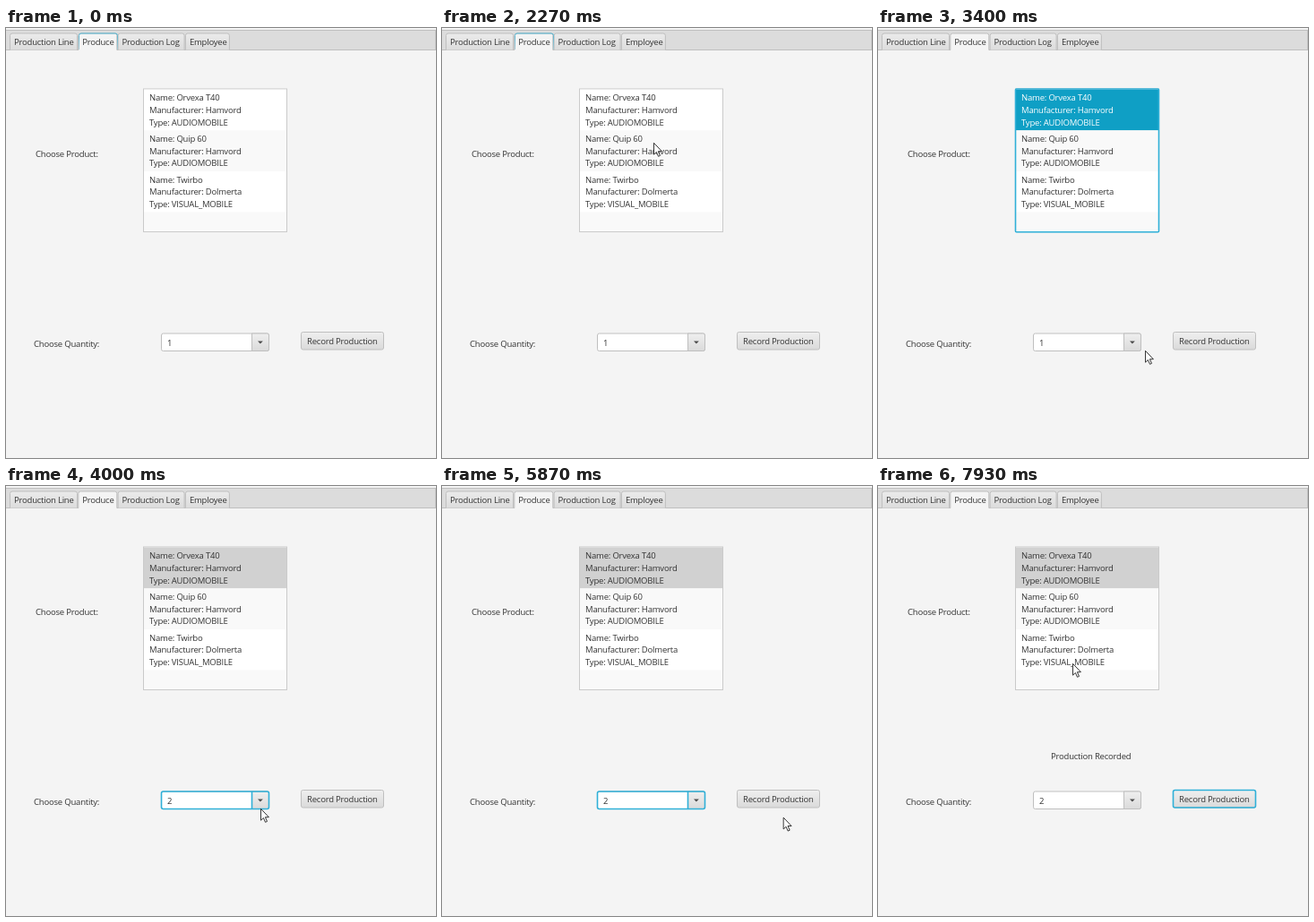
These frames come from a looping animation (480x480 px, 8 s). An HTML page:

```html
<!DOCTYPE html>
<html lang="en">
<head>
<meta charset="utf-8">
<title>Produce</title>
<style>
  html, body { margin: 0; width: 100%; height: 100%; overflow: hidden; background: #f4f4f4; }
  svg { display: block; width: 100%; height: 100%; }
  text { font: 9.5px "Open Sans", "Noto Sans", sans-serif; letter-spacing: -.2px; fill: #333; white-space: pre; }
  .edge { stroke: #bfbfbf; }
  .focus { fill: none; stroke: #2fb0d8; stroke-width: 1.6; }
</style>
</head>
<body>
<svg viewBox="0 0 480 480">
  <defs>
    <linearGradient id="raised" x2="0" y2="1"><stop stop-color="#efefef"/><stop offset="1" stop-color="#dadada"/></linearGradient>
    <linearGradient id="pressed" x2="0" y2="1"><stop stop-color="#d9d9d9"/><stop offset="1" stop-color="#c6c6c6"/></linearGradient>
    <linearGradient id="tab" x2="0" y2="1"><stop stop-color="#ebebeb"/><stop offset="1" stop-color="#dcdcdc"/></linearGradient>
    <linearGradient id="tabGlow" gradientUnits="userSpaceOnUse" x2="0" y1="6" y2="24">
      <stop stop-color="#4fb4d2"/><stop offset="1" stop-color="#a9c6d0"/>
    </linearGradient>
  </defs>
  <rect width="480" height="480" fill="#f4f4f4"/>
  <rect x="-.5" y="2.5" width="480" height="22" fill="#dcdcdc" class="edge"/>
  <g id="tabs"></g>
  <path id="tabFocus" fill="none" stroke="url(#tabGlow)" d="M81.5 24V8.5q0-2.5 2.5-2.5h38q2.5 0 2.5 2.5V24"/>

  <text x="33" y="144">Choose Product:</text>
  <rect x="153.5" y="68" width="160" height="159.5" fill="#f9f9f9" stroke="#cacaca"/>
  <g id="list"></g>
  <rect id="listFocus" class="focus" x="153.5" y="68" width="160" height="159.7" rx="1"/>

  <text id="status" x="193" y="304.7">Production Recorded</text>

  <text x="31" y="355.5">Choose Quantity:</text>
  <rect x="173.5" y="341" width="120" height="19.5" rx="2" fill="#fff" class="edge"/>
  <path d="M274.5 341H291.5q2 0 2 2V358.5q0 2-2 2H274.5Z" fill="url(#raised)" class="edge"/>
  <path d="M281 349.5h5.8l-2.9 3Z" fill="#4a4a4a"/>
  <text id="quantity" x="180" y="354.5">1</text>
  <path id="comboFocus" class="focus" d="M175.5 341H291.5q2 0 2 2V358.5q0 2-2 2H175.5q-2 0-2-2V343q0-2 2-2ZM274.5 341V360.5"/>

  <rect id="button" x="329.5" y="339.5" width="92" height="19.5" rx="2" fill="url(#raised)" class="edge"/>
  <rect id="buttonFocus" class="focus" x="329.5" y="339.5" width="92" height="19.5" rx="2"/>
  <text x="336" y="353">Record Production</text>

  <path id="cursor" d="M.5.3V13.2L3.4 10.5 5.5 15.3 7.5 14.4 5.4 9.7H9.4Z" fill="#fff" stroke="#222" stroke-width=".9"/>
</svg>
<script>
const FRAMES_PER_SECOND = 15, LOOP_SECONDS = 8;
const el = id => document.getElementById(id);

let tabX = 4.5;
for (const [label, width] of Object.entries({ "Production Line": 75, "Produce": 43, "Production Log": 74, "Employee": 49 })) {
  const active = label === "Produce";
  el("tabs").innerHTML += `
    <path d="M${tabX} 24.5V8.5q0-2.5 2.5-2.5h${width - 5}q2.5 0 2.5 2.5V24.5" class="edge"
      fill="${active ? "#f4f4f4" : "url(#tab)"}"/>
    ${active ? `<path d="M${tabX + .5} 24.5h${width - 1}" stroke="#f4f4f4"/>` : ""}
    <text x="${tabX + 4.5}" y="19.3">${label}</text>`;
  tabX += width + 1.3;
}

const products = [
  ["Orvexa T40", "Hamvord", "AUDIOMOBILE"],
  ["Quip 60", "Hamvord", "AUDIOMOBILE"],
  ["Twirbo", "Dolmerta", "VISUAL_MOBILE"]
];
const ROW = 45.6;
el("list").innerHTML = products.map(([name, maker, type], i) => {
  const top = 68.7 + i * ROW;
  const lines = [`Name: ${name}`, `Manufacturer: ${maker}`, `Type: ${type}`];
  return `<g><rect x="154" y="${top}" width="159" height="${ROW}" fill="${i % 2 ? "#f9f9f9" : "#fff"}"/>` +
    lines.map((line, n) => `<text x="160" y="${top + 12.7 + n * 13.6}">${line}</text>`).join("") + "</g>";
}).join("");
const firstRow = el("list").firstElementChild;

// Moments of the clicks, in seconds
const SELECT = 3.13, OPEN = 3.8, PICK = 4, PRESS = 6.86, RECORD = 7;

const spots = {
  tabs: [98, 10], list: [200, 90], listMiddle: [236, 128], listEdge: [174, 114], listEnd: [217, 198],
  productLabel: [74, 103], quantityLabel: [33, 341], quantity: [179, 341],
  arrow: [284, 360], besideArrow: [298, 360], belowButton: [382, 370], button: [372, 351]
};

// Each trip: departure, arrival, destination
const trips = [
  [.07, .13, "productLabel"], [.33, .6, "tabs"], [.6, 1.2, "list"], [1.27, 1.53, "listEnd"],
  [1.6, 1.8, "productLabel"], [1.93, 2.26, "listMiddle"], [2.4, 2.8, "quantityLabel"],
  [2.8, SELECT, "list"], [SELECT, 3.4, "besideArrow"], [3.4, OPEN, "arrow"], [PICK, 4.4, "tabs"],
  [4.4, 4.8, "listEdge"], [4.8, 5.2, "arrow"], [5.4, 5.86, "belowButton"], [5.86, 6, "quantity"],
  [6.13, 6.53, "button"], [RECORD, 7.33, "productLabel"], [7.33, 7.66, "button"], [7.7, 7.93, "listEnd"]
];

function pointerAt(time) {
  let [x, y] = spots.button;
  for (const [leave, arrive, name] of trips) {
    const u = Math.min(1, Math.max(0, (time - leave) / (arrive - leave)));
    const ease = u * u * (3 - 2 * u), [toX, toY] = spots[name];
    x += (toX - x) * ease;
    y += (toY - y) * ease;
  }
  return [x, y];
}

const show = (id, visible) => el(id).style.display = visible ? "" : "none";

function render(time) {
  const selected = time >= SELECT, listFocused = selected && time < OPEN;
  const pressed = time >= PRESS && time < PRESS + .07;
  show("tabFocus", !selected);
  show("listFocus", listFocused);
  show("comboFocus", time >= OPEN && time < PRESS);
  show("buttonFocus", time >= PRESS);
  show("status", time >= RECORD);
  show("cursor", time > 0);

  firstRow.firstElementChild.style.fill = listFocused ? "#0f9fc5" : selected ? "#d1d1d1" : "#fff";
  firstRow.querySelectorAll("text").forEach(line => line.style.fill = listFocused ? "#fff" : "#333");
  el("quantity").textContent = time >= PICK ? "2" : "1";
  el("button").setAttribute("fill", `url(#${pressed ? "pressed" : "raised"})`);
  el("cursor").setAttribute("transform", `translate(${pointerAt(time)})`);
}

const start = performance.now();
function frame() {
  const elapsed = performance.now() - start + 4; // keeps rounded times inside their step
  const step = Math.floor(elapsed * FRAMES_PER_SECOND / 1000);
  render(step % (LOOP_SECONDS * FRAMES_PER_SECOND) / FRAMES_PER_SECOND);
  requestAnimationFrame(frame);
}
frame();
</script>
</body>
</html>
```
